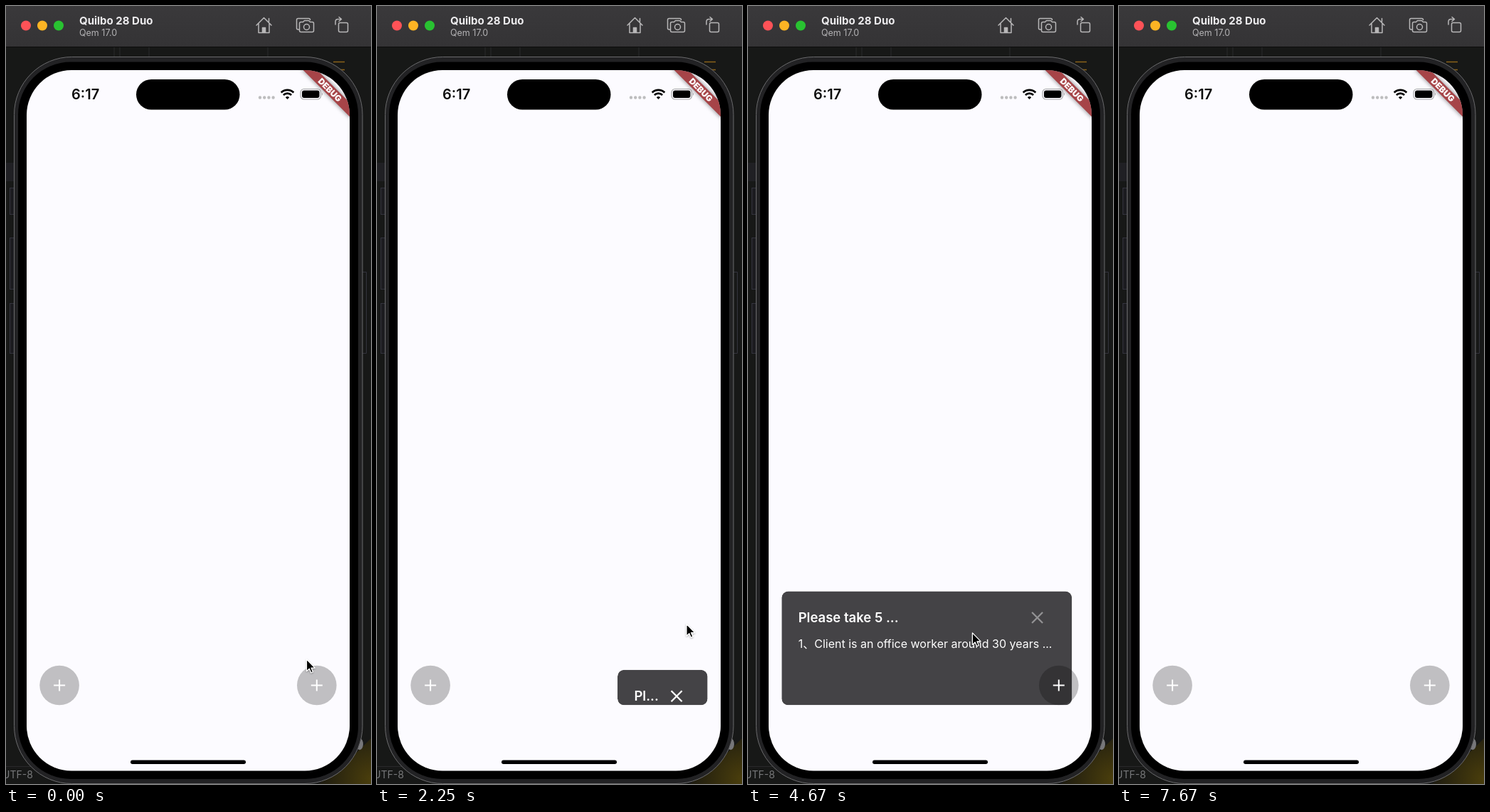
Recreate the animation shown at these times as an HTML page. Size 513x1092 px, loop 8.01 s.

```html
<!DOCTYPE html>
<html lang="en">
<head>
<meta charset="utf-8">
<title>Expanding cards</title>
<style>
html, body { margin: 0; width: 100%; height: 100%; overflow: hidden; background: #171817; }
svg { display: block; width: 100vw; height: 100vh; }
text { font-family: Inter, "Noto Sans CJK SC", "Noto Sans CJK JP", "Noto Sans", sans-serif; white-space: pre; }
.title { font-size: 18.5px; font-weight: 600; }
.body { font-size: 16px; }
</style>
</head>
<body>
<svg id="stage" viewBox="0 0 513 1092" xmlns="http://www.w3.org/2000/svg">
  <defs>
    <clipPath id="screen"><rect x="29" y="90" width="454" height="983.5" rx="63"/></clipPath>
    <linearGradient id="bar" x2="0" y2="1">
      <stop stop-color="#3a393b"/><stop offset="1" stop-color="#343335"/>
    </linearGradient>
    <radialGradient id="olive" gradientUnits="userSpaceOnUse" cx="513" cy="1085" r="75">
      <stop stop-color="#4a3e0c"/><stop offset="1" stop-color="#1c1a10"/>
    </radialGradient>
    <filter id="soft" x="-30%" y="-80%" width="160%" height="260%"><feGaussianBlur stdDeviation="3"/></filter>
    <filter id="shade" x="-50%" y="-50%" width="220%" height="220%">
      <feDropShadow dx="0" dy="1" stdDeviation="1" flood-opacity=".35"/>
    </filter>
  </defs>

  <!-- desktop behind the window -->
  <rect width="513" height="1092" fill="#171817"/>
  <path d="M152 58V72M160 58V72M201 58V72M368 58V72" stroke="#2b2b2c"/>
  <rect y="220" width="11" height="26" fill="#202024"/>
  <g fill="#1c1c20" stroke="#33333d">
    <rect x="5.500" y="255.500" width="20" height="37"/>
    <rect x="5.500" y="325.500" width="20" height="72"/>
    <rect x="5.500" y="417.500" width="20" height="70"/>
    <path d="M500 373.500H506.500V487.500H500" fill="none"/>
  </g>
  <path d="M460 78.500H476M460 89.500H476" stroke="#8a6219" stroke-width="1.500"/>
  <path d="M513 1028V1092H440L480 1060Z" fill="url(#olive)"/>
  <path d="M0 1067.500H40" stroke="#29292a"/>
  <ellipse cx="497" cy="1036" rx="5" ry="8" fill="#77777a"/>
  <text x="-5" y="1084" font-size="14" fill="#77787a">UTF-8</text>

  <!-- toolbar -->
  <rect width="513" height="57" fill="url(#bar)"/>
  <path d="M0 57.500H513" stroke="#0c0c0c"/>
  <circle cx="28" cy="27.500" r="7" fill="#fe5257"/>
  <circle cx="51" cy="27.500" r="7" fill="#fdb424"/>
  <circle cx="74" cy="27.500" r="7" fill="#29c231"/>
  <text x="103" y="25.500" font-size="15" font-weight="700" fill="#edecee">Quilbo 28 Duo</text>
  <text x="103" y="41.500" font-size="12.500" fill="#b3b2b4">Qem 17.0</text>
  <g fill="none" stroke="#b8b7b8" stroke-width="1.500" stroke-linejoin="round" stroke-linecap="round">
    <path d="M352 27L362.500 16.500L373 27M355 25V37.500H370V25M369.500 22V17.500"/>
    <path d="M360.500 37V30.500H364.500V37" fill="#b8b7b8"/>
    <path d="M412 33H410.500Q408.500 33 408.500 31V19.500Q408.500 17.500 410.500 17.500H425.500Q427.500 17.500 427.500 19.500"/>
    <path d="M414.500 22.500H417.500L419.500 20.500H425.500L427.500 22.500H430.500Q432.500 22.500 432.500 24.500V34.500Q432.500 36.500 430.500 36.500H414.500Q412.500 36.500 412.500 34.500V24.500Q412.500 22.500 414.500 22.500Z"/>
    <circle cx="422.500" cy="29.500" r="4"/>
    <rect x="467.500" y="23.500" width="13" height="13" rx="2"/>
    <path d="M463 26V22Q463 18.500 466.500 18.500H471M468 15.500L471.500 18.500L468 21.500"/>
  </g>

  <!-- phone -->
  <rect x="11.500" y="71.500" width="489.500" height="1020" rx="81" fill="#222224" stroke="#6a6a6c"/>
  <rect x="17" y="78.500" width="478" height="1006.500" rx="74" fill="#000"/>
  <rect x="29" y="90" width="454" height="983.500" rx="63" fill="#fcfbff"/>
  <rect x="183" y="103" width="145.500" height="42.500" rx="21.250"/>
  <text x="92" y="131" font-size="20" font-weight="600" fill="#0b0b0b">6:17</text>
  <path d="M357 128.500H376" stroke="#bdbdbe" stroke-width="4.400" stroke-linecap="round" stroke-dasharray="0 6.200"/>
  <g fill="none" stroke="#000" stroke-width="2.700">
    <path d="M386.700 121.500A12.500 12.500 0 0 1 404.300 121.500"/>
    <path d="M389.900 125A8 8 0 0 1 401.100 125"/>
    <path d="M395.500 131L392.800 128.300A4 4 0 0 1 398.200 128.300Z" fill="#000" stroke="none"/>
  </g>
  <rect x="414" y="116.500" width="28.500" height="14.500" rx="4.800" fill="none" stroke="#a5a5a7" stroke-width="1.200"/>
  <rect x="416" y="118.500" width="24.500" height="10.500" rx="3"/>
  <path d="M444 121.500Q446 123.700 444 126Z" fill="#a5a5a7"/>
  <g clip-path="url(#screen)">
    <g transform="translate(483 90) rotate(45)">
      <rect x="-48" y="32.300" width="96" height="13.900" fill="#000" opacity=".5" filter="url(#soft)"/>
      <rect x="-48" y="32.300" width="96" height="13.900" fill="#a64448"/>
      <text y="43.500" font-size="11.800" font-weight="900" fill="#fff" text-anchor="middle">DEBUG</text>
    </g>
  </g>
  <rect x="175" y="1058.500" width="162" height="5.500" rx="2.750"/>

  <g id="cards"></g>
  <path id="cursor" d="M0 0V16.600L3.800 13.100L6.300 18.800L8.900 17.700L6.500 12.100H11.700Z"
    stroke="#fff" stroke-width="1.200" stroke-linejoin="round" filter="url(#shade)"/>
</svg>
<script>
const LOOP = 8010, STEP = 1000 / 12, SPAN = 300;
const LEFT = 47.3, RIGHT = 464.6, BOTTOM = 981.3, FULL = RIGHT - LEFT;
const TITLE = "Please take 5 minutes";
const LINES = [
  "1、Client is an office worker around 30 years old",
  "2、I want a family car, about 200,000",
  "3、Urban NOLVA assisted driving",
  "4、Faster car"
];
const FONTS = 'Inter, "Noto Sans CJK SC", "Noto Sans CJK JP", "Noto Sans", sans-serif';
const TITLE_FONT = "600 18.5px " + FONTS, BODY_FONT = "400 16px " + FONTS;

// pointer tip: time, x, y
const PATH = [
  [0, 422.5, 917], [250, 437, 943], [917, 437, 943], [1333, 413, 839], [1583, 413, 839],
  [1917, 437, 945], [2000, 437, 945], [2250, 435, 867.5], [2333, 425, 848], [2500, 416, 841],
  [2917, 414, 842], [3000, 340, 872], [3167, 108.5, 944], [3333, 72, 955], [3583, 70, 952],
  [4250, 412, 844], [4583, 416, 842], [4667, 315, 880], [4833, 120, 940], [5083, 11, 966],
  [5167, 11, 966], [5500, 63, 955], [5667, 63, 955], [6167, 466, 830], [6333, 438, 833],
  [6500, 420, 840], [6700, 420, 840], [7417, 448, -3], [7667, 449, -26]
];

const $ = id => document.getElementById(id);
const clamp = v => Math.max(0, Math.min(1, v));
const pen = document.createElement("canvas").getContext("2d");

function add(parent, tag, attrs = {}, text = "") {
  const el = document.createElementNS("http://www.w3.org/2000/svg", tag);
  set(el, attrs);
  el.textContent = text;
  parent.appendChild(el);
  return el;
}

function set(el, attrs) {
  for (const key in attrs) el.setAttribute(key, attrs[key]);
}

function ellipsize(text, font, room) {
  pen.font = font;
  if (pen.measureText(text).width <= room) return text;
  let n = text.length;
  while (n > 0 && pen.measureText(text.slice(0, n) + "...").width > room) n--;
  return text.slice(0, n) + "...";
}

function makeCard(name, side, runs) {
  const root = $("cards");
  const cx = side < 0 ? LEFT + 27.8 : RIGHT - 27.8;
  const button = add(root, "g", { transform: `translate(${cx} 953.5)` });
  add(button, "circle", { r: 27.8, fill: "#000", "fill-opacity": .24 });
  add(button, "path", { d: "M-8 0H8M0 -8V8", stroke: "#fff", "stroke-width": 2 });

  const clip = add(add(root, "clipPath", { id: name }), "rect");
  const panel = add(root, "g", { "clip-path": `url(#${name})` });
  const back = add(panel, "rect", { fill: "#444346" });
  const content = add(panel, "g", { fill: "#fff" });
  const title = add(content, "text", { class: "title", x: 23.4, y: 43.3 });
  const lines = LINES.map((s, i) =>
    add(content, "text", { class: "body", x: 23.4, y: 79.3 + i * 23.2 }, s));
  const cross = add(content, "path", { d: "M-7.500 -7.500L7.500 7.500M-7.500 7.500L7.500 -7.500", stroke: "#fff", "stroke-width": 2.3 });

  return t => {
    let p = 0, fade = 1;
    for (const [open, close] of runs) {
      p += clamp((t - open) / SPAN) - clamp((t - close) / SPAN);
      if (t >= close - 80) fade = .42 + .58 * clamp((t - close - 20) / 100);
    }
    const closed = p < .001, full = p > .999;
    button.style.display = closed ? "" : "none";
    panel.style.display = closed ? "none" : "";
    if (closed) return;

    const w = full ? FULL : FULL * p, h = full ? 178 : .3915 * w;
    const x = side < 0 ? LEFT : RIGHT - w, y = BOTTOM - h;
    const box = { x, y, width: w, height: h, rx: Math.min(9, h / 2) };
    set(clip, box);
    set(back, box);
    set(content, { transform: `translate(${x} ${y})` });
    title.textContent = ellipsize(TITLE, TITLE_FONT, Math.min(148, .553 * w - 33.5));
    lines[0].textContent = full ? LINES[0] : ellipsize(LINES[0], BODY_FONT, w - (w < 250 ? 73 : 46));
    lines.slice(1).forEach(el => el.style.display = full ? "" : "none");
    set(cross, { transform: `translate(${w - (w < 150 ? 43.5 : 48.7)} 37)`, opacity: fade });
  };
}

const cards = [
  makeCard("clipLeft", -1, [[3490, 4660], [5655, 6740]]),
  makeCard("clipRight", 1, [[413, 1570], [2159, 3012]])
];

function pointer(t) {
  const i = PATH.findIndex(k => k[0] > t);
  if (i < 0) return PATH[PATH.length - 1].slice(1);
  const [t0, x0, y0] = PATH[i - 1], [t1, x1, y1] = PATH[i];
  const k = (t - t0) / (t1 - t0);
  return [x0 + (x1 - x0) * k, y0 + (y1 - y0) * k];
}

function draw(ms) {
  const t = Math.floor((ms % LOOP + 4) / STEP) * STEP;
  cards.forEach(card => card(t));
  set($("cursor"), { transform: `translate(${pointer(t).join(" ")})` });
}

const start = performance.now();
function tick() {
  draw(performance.now() - start);
  requestAnimationFrame(tick);
}
tick();
</script>
</body>
</html>
```
